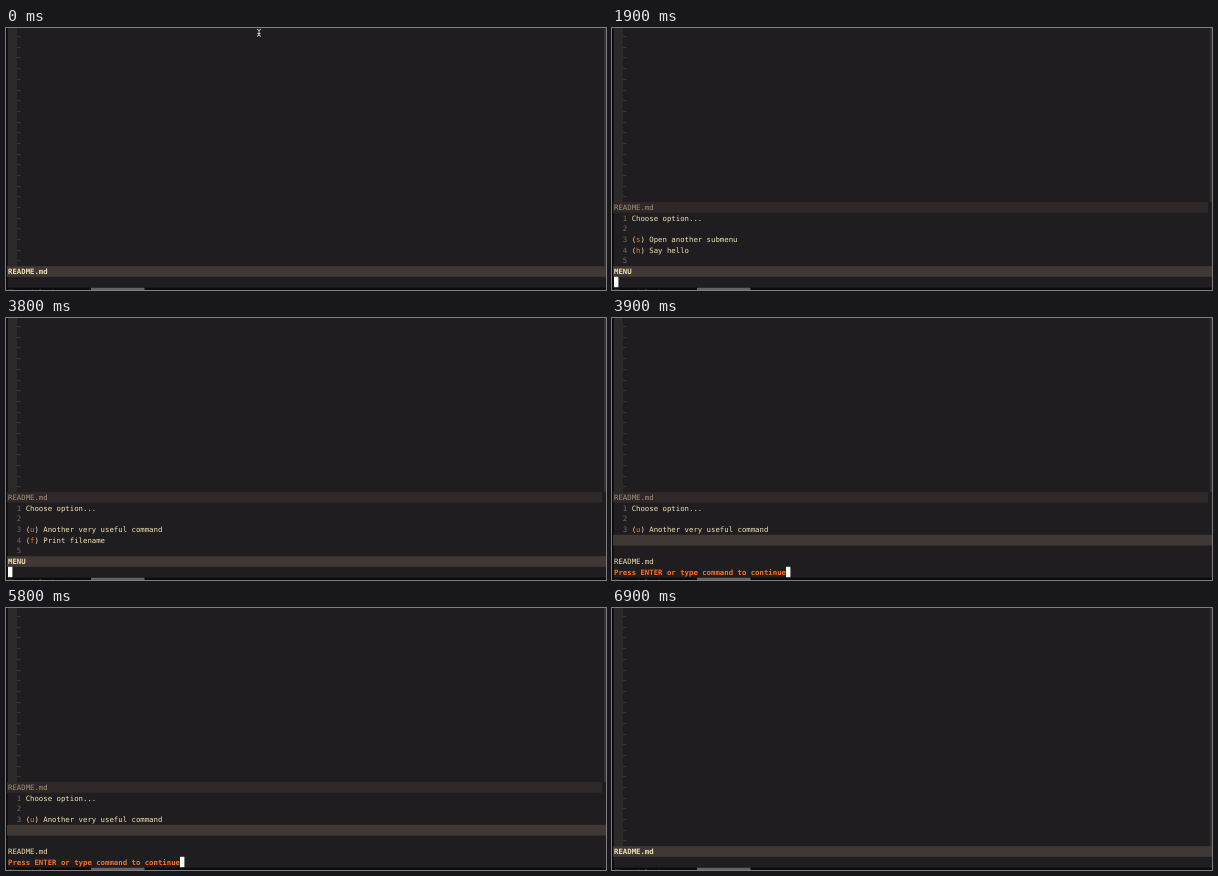
Animation, 600 px wide and 262 px high, one loop 7300 ms. Source, as an HTML page with a canvas:

```html
<!DOCTYPE html>
<html lang="en">
<head>
<meta charset="utf-8">
<title>Terminal menu</title>
<style>
html, body { margin: 0; width: 100%; height: 100%; overflow: hidden; background: #1f1d1f; }
canvas { display: block; }
</style>
</head>
<body>
<canvas id="stage" width="600" height="262"></canvas>
<script>
const ctx = document.getElementById('stage').getContext('2d');
const LOOP = 7300, COL = 4.41, ROW = 10.68, LEFT = 2, TOP = 3.2;
const BG = '#1f1d1f', CREAM = '#f0e2b4', DIM = '#a09080', NUMBER = '#756a60',
      ORANGE = '#fe7020', ACTIVE = '#403835', INACTIVE = '#302828';

const rowY = row => TOP + row * ROW;

function rect(x, y, w, h, color) {
  ctx.fillStyle = color;
  ctx.fillRect(x, y, w, h);
}

// Each character sits in its own terminal cell.
function print(row, col, text, color, bold) {
  ctx.font = `${bold ? 'bold ' : ''}7.33px "DejaVu Sans Mono", monospace`;
  ctx.fillStyle = color;
  [...text].forEach((ch, i) =>
    ctx.fillText(ch, LEFT + (col + i) * COL, rowY(row) + 7.9));
}

function bar(row, text, active) {
  rect(LEFT - 1, rowY(row), active ? 599 : 595, ROW, active ? ACTIVE : INACTIVE);
  print(row, 0, text, active ? CREAM : DIM, active);
}

function cursor(col) {
  rect(LEFT + col * COL, 248.8, 4.4, 10.4, '#fff');
}

function pointer(y) {
  ctx.strokeStyle = '#d0d0d0';
  ctx.lineWidth = 1;
  ctx.beginPath();
  ctx.moveTo(251, y - 4);
  ctx.lineTo(253, y - 2.5);
  ctx.lineTo(255, y - 4);
  ctx.moveTo(253, y - 2.5);
  ctx.lineTo(253, y + 2);
  ctx.moveTo(251, y + 3.5);
  ctx.lineTo(253, y + 2);
  ctx.lineTo(255, y + 3.5);
  ctx.moveTo(251.5, y + 0.5);
  ctx.lineTo(254.5, y + 0.5);
  ctx.stroke();
}

function editor(rows) {
  const bottom = rowY(rows);
  rect(2, 0, 9, bottom, '#2c292a');
  for (let row = 0; row < rows; row++) print(row, 2, '~', '#504944');
  rect(598, 0, 2, bottom, '#343133');
  bar(rows, 'README.md', rows === 22);
}

function menu(options, lines) {
  const texts = ['Choose option...', '', ...options, ''];
  texts.slice(0, lines).forEach((text, i) => {
    print(17 + i, 2, String(i + 1), NUMBER);
    print(17 + i, 4, text, CREAM);
    if (text[0] === '(') {
      rect(LEFT + 5 * COL, rowY(17 + i), COL, ROW, BG);
      print(17 + i, 5, text[1], ORANGE);
    }
  });
}

function tabLine() {
  rect(0, 259.6, 600, 3, '#0c0b0c');
  print(24, 0, 'The title bar text', '#6a6044');
  rect(85, 259.7, 53.5, 3, '#626062');
}

const MAIN = ['(s) Open another submenu', '(h) Say hello'];
const SUB = ['(u) Another very useful command', '(f) Print filename'];

function draw(t) {
  rect(0, 0, 600, 262, BG);
  rect(0, 0, 1.5, 262, '#080708');
  const open = t >= 800 && t < 6000;
  const message = open && t >= 3900;
  editor(open ? 16 : 22);
  if (t < 500) pointer(t < 400 ? 5 : 3);
  if (open) {
    menu(t < 2300 ? MAIN : SUB, message ? 3 : 5);
    bar(message ? 20 : 22, message ? '' : 'MENU', true);
  }
  tabLine();
  if (message) {
    print(22, 0, 'README.md', CREAM);
    const prompt = 'Press ENTER or type command to continue';
    print(23, 0, prompt, ORANGE, true);
    cursor(prompt.length);
  } else if (open) {
    cursor(0);
  }
}

const start = performance.now();
function tick() {
  draw((performance.now() - start) % LOOP);
  requestAnimationFrame(tick);
}
tick();
</script>
</body>
</html>
```
